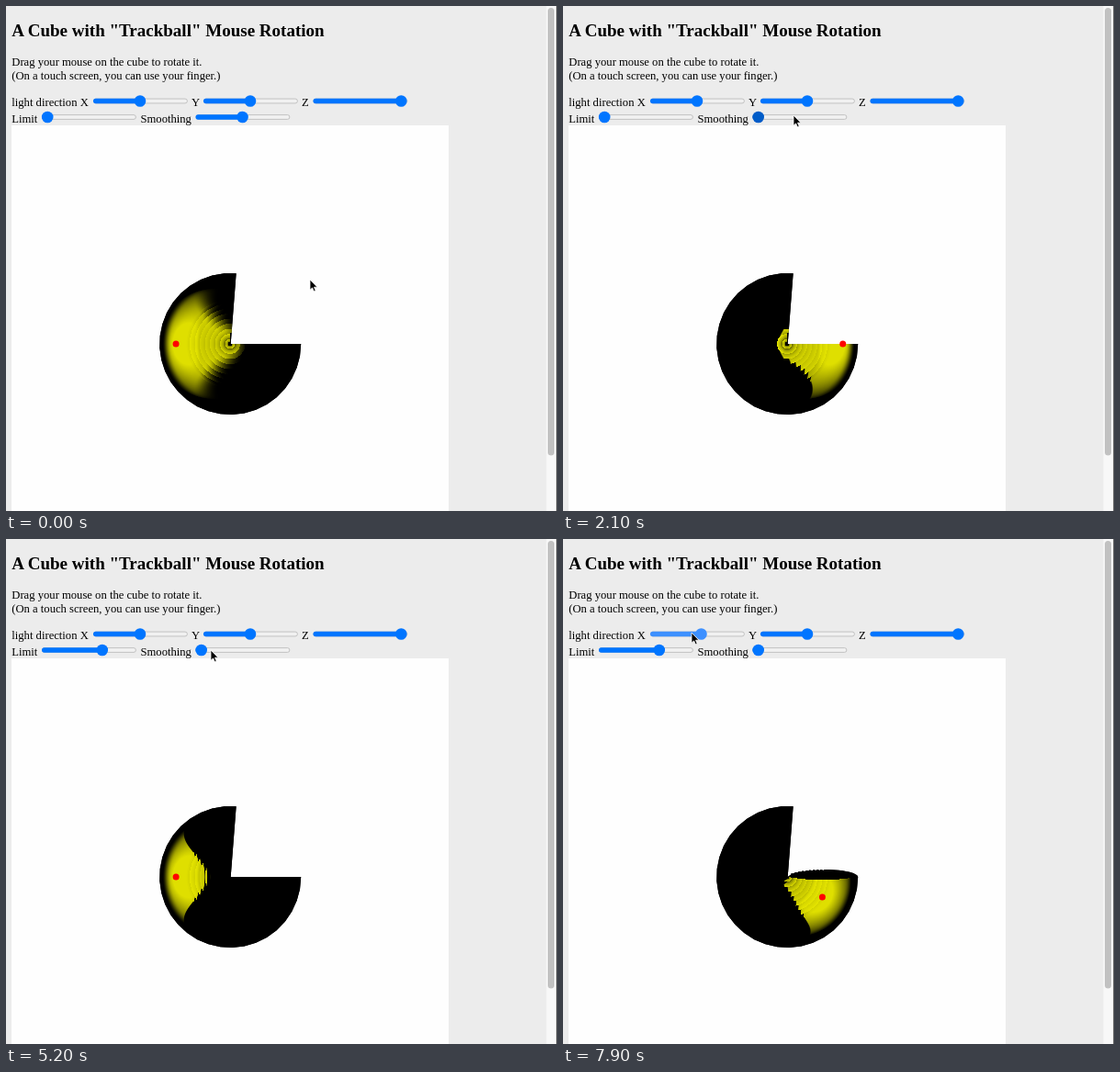
An HTML page with a canvas that plays this animation: 600 px wide and 550 px high, repeating every 8000 ms.

```html
<!DOCTYPE html>
<html lang="en">
<head>
<meta charset="utf-8">
<title>Trackball rotation</title>
<style>
  html, body { margin: 0; width: 100%; height: 100%; overflow: hidden; background: #ececec; }
  #stage { position: relative; width: 600px; height: 550px; overflow: hidden; }
  canvas, svg { position: absolute; left: 0; top: 0; }
  text { font: 12.64px "Liberation Serif", "Times New Roman", serif; fill: #000; }
  text.title { font-size: 19.03px; font-weight: bold; }
</style>
</head>
<body>
<div id="stage">
  <canvas id="view" width="600" height="550"></canvas>
  <svg id="ui" width="600" height="550" viewBox="0 0 600 550">
    <rect x="588.5" width="11.5" height="550" fill="#f8f8f8"/>
    <rect x="590" y="2" width="7" height="487.5" rx="3.5" fill="#c1c1c1"/>
    <rect x="599" width="1" height="550" fill="#777"/>
    <text class="title" x="6.3" y="33">A Cube with "Trackball" Mouse Rotation</text>
    <text x="6.3" y="65">Drag your mouse on the cube to rotate it.</text>
    <text x="6.3" y="79.7">(On a touch screen, you can use your finger.)</text>
    <text x="6.3" y="109">light direction X</text>
    <text x="202" y="109">Y</text>
    <text x="322" y="109">Z</text>
    <text x="6.3" y="127">Limit</text>
    <text x="146.5" y="127">Smoothing</text>
    <g id="sliders"></g>
    <path id="cursor" d="M0 0V11.2L2.6 8.9L4.3 12.7L6.2 11.9L4.5 8.2H8Z"
      fill="#000" stroke="#fff" stroke-width=".8"/>
  </svg>
</div>
<script>
const LOOP = 8000, STEP = 100;
const CX = 244.2, CY = 368, TUBE = 38.5, RADIUS = 77, SIZE = 160;
const END = 274.8 * Math.PI / 180;
const BLUE = '#0075ff', DARK = '#005cc8', LIGHT = '#3d90ff';

// Rows are [time, value, ...], linear between rows
const tracks = {
  mouse: [[0, 331, 298], [200, 331, 296], [900, 285, 160], [1200, 263, 114.5], [1800, 261, 116],
    [2100, 251, 119], [2400, 212, 120], [2900, 150, 121], [3500, 45, 121], [3900, 58, 122],
    [4200, 105, 121], [4500, 108, 122], [5200, 223, 121], [5400, 230, 125], [5900, 265, 325],
    [6400, 265, 348], [6800, 165, 160], [7100, 131, 100], [7500, 131, 101], [7900, 140, 102]],
  limit: [[3600, 0], [3900, .605], [4200, .665]],
  smooth: [[1800, .5], [2100, 0]],
  dirX: [[7500, .5], [7900, .55]],
  tilt: [[5900, 0], [6400, 1]]
};

// [from, to, slider, track colour, thumb colour]
const states = [
  [1100, 1800, 'smooth', DARK, DARK],
  [1800, 2100, 'smooth', LIGHT, LIGHT],
  [2100, 2500, 'smooth', DARK, DARK],
  [3300, 3700, 'limit', DARK, DARK],
  [3700, 4200, 'limit', LIGHT, DARK],
  [4200, 4600, 'limit', DARK, DARK],
  [7000, 7500, 'dirX', DARK, BLUE],
  [7500, 8000, 'dirX', LIGHT, LIGHT]
];

const sliders = {
  dirX: [95, 103.5], dirY: [215, 103.5], dirZ: [334.5, 103.5],
  limit: [39, 121], smooth: [206.5, 121]
};

const clamp = (v, a = 0, b = 1) => Math.min(b, Math.max(a, v));
const ease = v => { v = clamp(v); return v * v * (3 - 2 * v); };

function at(rows, t) {
  const i = rows.findIndex(row => row[0] > t);
  if (i === 0) return rows[0].slice(1);
  if (i < 0) return rows[rows.length - 1].slice(1);
  const a = rows[i - 1], b = rows[i], k = (t - a[0]) / (b[0] - a[0]);
  return a.slice(1).map((v, n) => v + (b[n + 1] - v) * k);
}

function add(parent, tag, attrs) {
  const el = document.createElementNS('http://www.w3.org/2000/svg', tag);
  for (const key in attrs) el.setAttribute(key, attrs[key]);
  return parent.appendChild(el);
}

const group = document.getElementById('sliders');
const parts = {};
for (const name in sliders) {
  const [x, y] = sliders[name];
  add(group, 'rect', { x: x + .4, y: y - 2.4, width: 102, height: 4.8, rx: 2.4,
    fill: '#f1f1f1', stroke: '#b6b6b6', 'stroke-width': .8 });
  parts[name] = {
    fill: add(group, 'rect', { x, y: y - 2.7, height: 5.4, rx: 2.7 }),
    thumb: add(group, 'circle', { cy: y, r: 6.3 })
  };
}

function setSlider(name, value, t) {
  const x = sliders[name][0], pos = 6.2 + 89.6 * value;
  const state = states.find(s => s[2] === name && t >= s[0] && t < s[1]);
  const { fill, thumb } = parts[name];
  fill.setAttribute('width', pos);
  fill.setAttribute('fill', state ? state[3] : BLUE);
  thumb.setAttribute('cx', x + pos);
  thumb.setAttribute('fill', state ? state[4] : BLUE);
}

const ctx = document.getElementById('view').getContext('2d');
const glow = document.createElement('canvas');
glow.width = glow.height = SIZE;
const glowCtx = glow.getContext('2d');
const image = glowCtx.createImageData(SIZE, SIZE);

const slopeAt = r => (r - TUBE) / TUBE;
const facing = r => Math.sqrt(Math.max(0, 1 - slopeAt(r) ** 2));

// Brightness of the ringed half-tube under a spotlight pointing into the screen
function shade(x, y, lamp, tan, soft) {
  const r = Math.hypot(x, y);
  if (r > RADIUS || r < 2.2) return 0;
  const nz = facing(r);
  const saw = r < 48 ? (r % 5.5) / 5.5 : .5;
  const dx = lamp.x - x, dy = lamp.y - y;
  const h = lamp.z - TUBE * facing(Math.max(r, 9)) + 3 * (saw - .5);
  const dist = Math.hypot(dx, dy, h);
  const edge = 1 / Math.hypot(1, tan);
  const spot = ease((h / dist - edge + soft * .14) / (soft * .32 + .012));
  if (!spot) return 0;
  let lit = (slopeAt(r) * (x * dx + y * dy) / r + nz * h) / dist;
  lit = clamp(1.2 * Math.pow(Math.max(0, lit), .6));
  if (r < TUBE) lit = Math.max(lit, .93);
  const rim = r < TUBE ? 1 : ease((nz - .4) / .35);
  const ring = 1 - (.07 + .95 * Math.exp(-r / 7)) * (r < 48 ? 1 - saw : .3);
  return spot * lit * rim * ring;
}

function paintGlow(lamp, tan, soft, tilt) {
  const half = SIZE / 2, data = image.data;
  for (let j = 0, p = 0; j < SIZE; j++) {
    for (let i = 0; i < SIZE; i++, p += 4) {
      const x = i + .5 - half, y = j + .5 - half;
      const lip = x > 0 && y > -12 && y < 3.5 * tilt * Math.sin(Math.PI * clamp(x / RADIUS));
      const v = lip ? 0 : 228 * shade(x, y, lamp, tan, soft);
      data[p] = data[p + 1] = v;
      data[p + 2] = 0;
      data[p + 3] = 255;
    }
  }
  glowCtx.putImageData(image, 0, 0);
}

function outline(tilt) {
  ctx.beginPath();
  ctx.moveTo(CX + .5, CY);
  // The open end of the tube rises in small steps when tipped
  for (let x = 4; x < RADIUS && tilt; x += 4) {
    const k = x / RADIUS;
    const y = CY - 16 * tilt * Math.sqrt(k * (1 - k));
    ctx.lineTo(CX + x, y + (x < 44 ? 1 : 0));
    ctx.lineTo(CX + x, y);
  }
  const count = 28;
  for (let i = 0; i <= count; i++) {
    const a = END * i / count;
    ctx.lineTo(CX + RADIUS * Math.cos(a), CY + RADIUS * Math.sin(a));
  }
  ctx.closePath();
}

function draw(t) {
  const [limit] = at(tracks.limit, t), [soft] = at(tracks.smooth, t);
  const [dirX] = at(tracks.dirX, t), [tilt] = at(tracks.tilt, t);
  const lamp = { x: 69 * Math.sin(t / 1000 - 1.03), y: 22 * tilt, z: 67 - 3 * tilt };

  ctx.fillStyle = '#ececec';
  ctx.fillRect(0, 0, 600, 550);
  ctx.fillStyle = '#fefefe';
  ctx.fillRect(6, 130, 476, 420);

  paintGlow(lamp, 1.82 - 1.05 * limit, soft, tilt);
  outline(tilt);
  ctx.fillStyle = '#000';
  ctx.fill();
  ctx.save();
  ctx.clip();
  ctx.drawImage(glow, Math.round(CX) - SIZE / 2, CY - SIZE / 2);
  ctx.restore();

  ctx.fillStyle = '#f00';
  ctx.beginPath();
  ctx.arc(CX + lamp.x, CY + lamp.y, 3.5, 0, 7);
  ctx.fill();

  const values = { dirX, dirY: .5, dirZ: 1, limit, smooth: soft };
  for (const name in values) setSlider(name, values[name], t);
  const [mx, my] = at(tracks.mouse, t);
  document.getElementById('cursor').setAttribute('transform', `translate(${mx} ${my})`);
}

let start = null, last = -1;
function tick(now) {
  if (start === null) start = now;
  const t = Math.floor((now - start) % LOOP / STEP) * STEP;
  if (t !== last) draw(last = t);
  requestAnimationFrame(tick);
}
draw(0);
requestAnimationFrame(tick);
</script>
</body>
</html>
```
